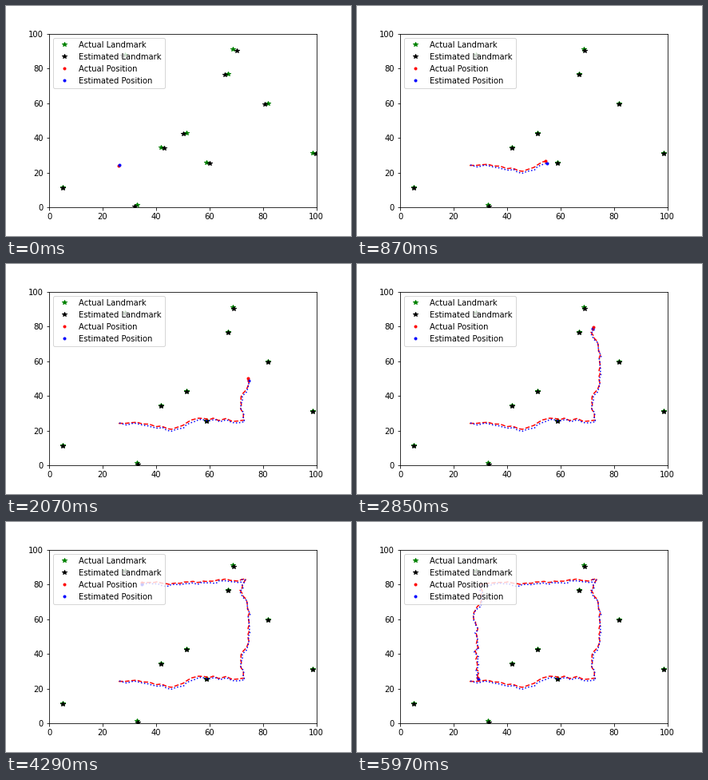
These frames come from a looping animation (432 px wide and 288 px high, 6000 ms). A matplotlib script:

```python
import numpy as np
import matplotlib.pyplot as plt
from matplotlib.animation import FuncAnimation

FRAMES, STEP_MS = 200, 30
BIAS = np.array([0.1, -0.55])    # error left in the landmark estimates
OFFSET = np.array([0.1, -0.9])   # error of the estimated position

rng = np.random.default_rng(4)
steps = np.arange(FRAMES)

landmarks = np.array([
    [5, 11.7], [33, 1.2], [41.7, 34.7], [51.3, 42.7], [58.7, 25.9],
    [66.8, 76.7], [68.8, 90.9], [81.7, 59.7], [98.5, 31.5], [28.5, 88]])

# Bends of the walk: step, x, y
bends = np.array([
    [0, 26, 24.1], [11, 37.2, 24], [20, 45.8, 20.6], [30, 55.6, 26.9],
    [48, 72.7, 25.7], [60, 71.3, 39.4], [66, 74.7, 46.7], [83, 74.5, 65.8],
    [92, 71.9, 76.2], [98, 73.4, 82.8], [123, 51.7, 81.4], [131, 45, 80.1],
    [138, 39.5, 81.5], [148, 30.6, 80], [159, 30.1, 69], [163, 27.3, 64],
    [175, 28.7, 52.6], [199, 29.1, 26.3]])


def wobble(size):
    """Smoothed random jitter that starts from nothing."""
    noise = rng.normal(0, size, (FRAMES, 2))
    smooth = [np.convolve(n, [0.25, 0.5, 0.25], "same") for n in noise.T]
    return np.column_stack(smooth) * np.minimum(steps / 4, 1)[:, None]


def guess(frame):
    """Landmark estimates settle from a sideways error."""
    swing = -1.2 * np.sign(np.sin(3 * np.arange(len(landmarks))))
    spot = landmarks + BIAS
    spot[:, 0] += swing * np.exp(-frame / 4)
    return spot


actual = np.column_stack([np.interp(steps, bends[:, 0], bends[:, k]) for k in (1, 2)])
actual += wobble(0.5)
estimated = actual + OFFSET * np.minimum(steps / 4, 1)[:, None] + wobble(0.45)
estimated[0] += 0.3

fig, ax = plt.subplots(figsize=(6, 4), dpi=72)
fig.subplots_adjust(left=0.125, right=0.9, bottom=0.125, top=0.88)
ax.set(xlim=(0, 100), ylim=(0, 100))

ax.plot(*landmarks.T, "g*", label="Actual Landmark")
stars, = ax.plot([], [], "k*", label="Estimated Landmark")
red_dot, = ax.plot([], [], "r.", label="Actual Position")
blue_dot, = ax.plot([], [], "b.", label="Estimated Position")
red_trail, = ax.plot([], [], "r--")
blue_trail, = ax.plot([], [], "b:")
ax.legend(loc="upper left")


def update(frame):
    stars.set_data(*guess(frame).T)
    for path, dot, trail in ((actual, red_dot, red_trail),
                             (estimated, blue_dot, blue_trail)):
        dot.set_data(*path[frame:frame + 1].T)
        trail.set_data(*path[:frame + 1].T)
    return stars, red_dot, blue_dot, red_trail, blue_trail


anim = FuncAnimation(fig, update, frames=FRAMES, interval=STEP_MS,
                     repeat=True, repeat_delay=0)
plt.show()
```
